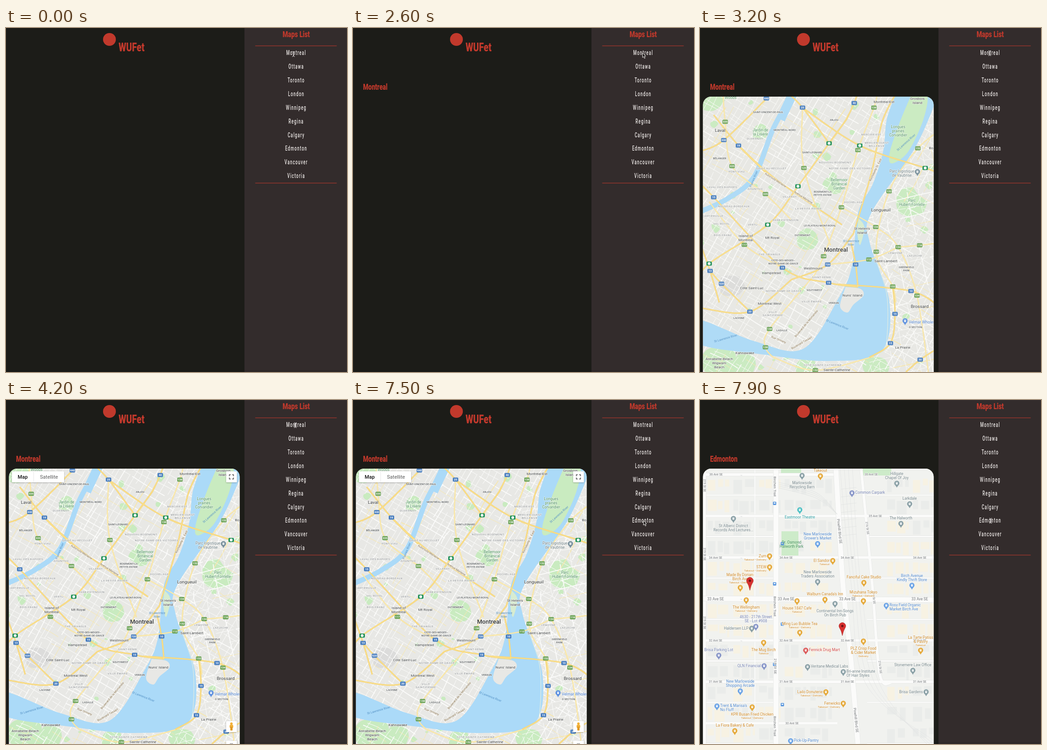
An HTML page with a canvas that plays this animation: 745 by 752 pixels, repeating every 8 s.

```html
<!DOCTYPE html>
<html lang="en">
<head>
<meta charset="utf-8">
<title>City maps</title>
<style>
html,body{margin:0;width:100%;height:100%;overflow:hidden;background:#1c1c18}
canvas{display:block}
</style>
</head>
<body>
<canvas id="stage" width="745" height="752"></canvas>
<script>
const W = 745, H = 752, LOOP = 8000, STEP = 100;
const FONT = 'Roboto, "Open Sans", sans-serif';
const RED = '#c1392c', BLANK = '#e4e4dc';
const ctx = document.getElementById('stage').getContext('2d');

const clamp = v => Math.max(0, Math.min(1, v));
const random = seed => () => (seed = (seed * 16807) % 2147483647) / 2147483647;
const layer = () => {
  const c = document.createElement('canvas');
  c.width = W; c.height = H;
  return c.getContext('2d');
};

function rect(g, x, y, w, h, color) {
  g.fillStyle = color;
  g.fillRect(x, y, w, h);
}
function round(g, x, y, w, h, r, color) {
  g.fillStyle = color;
  g.beginPath();
  g.roundRect(x, y, w, h, r);
  g.fill();
}
function disc(g, x, y, r, color) {
  g.fillStyle = color;
  g.beginPath();
  g.arc(x, y, r, 0, 7);
  g.fill();
}

// Smooth curve through flat x,y points
function trace(g, p) {
  const n = p.length / 2;
  const at = i => { const k = Math.max(0, Math.min(n - 1, i)) * 2; return [p[k], p[k + 1]]; };
  g.beginPath();
  g.moveTo(p[0], p[1]);
  for (let i = 0; i < n - 1; i++) {
    const [a, b, c, d] = [at(i - 1), at(i), at(i + 1), at(i + 2)];
    g.bezierCurveTo(b[0] + (c[0] - a[0]) / 6, b[1] + (c[1] - a[1]) / 6,
      c[0] - (d[0] - b[0]) / 6, c[1] - (d[1] - b[1]) / 6, c[0], c[1]);
  }
}
function line(g, p, width, color) {
  trace(g, p);
  g.lineWidth = width;
  g.strokeStyle = color;
  g.stroke();
}
function area(g, p, color) {
  trace(g, p);
  g.fillStyle = color;
  g.fill();
}
function roads(g, list, width, edge, fill) {
  for (const p of list) line(g, p, width + 1, edge);
  for (const p of list) line(g, p, width, fill);
}

// Text with "|" as line break, centred vertically on the first line
function label(g, x, y, text, o) {
  g.save();
  g.translate(x, y);
  g.rotate((o.turn || 0) * Math.PI / 180);
  g.font = `${o.weight || 400} ${o.size}px ${FONT}`;
  g.letterSpacing = (o.space || 0) + 'px';
  g.textAlign = o.align || 'center';
  g.textBaseline = 'middle';
  g.fillStyle = o.color;
  g.lineJoin = 'round';
  text.split('|').forEach((s, i) => {
    const dy = i * o.size * 1.13 + .5;
    if (o.halo) {
      g.strokeStyle = o.halo;
      g.lineWidth = 1.6;
      g.strokeText(s, 0, dy);
    }
    g.fillText(s, 0, dy);
  });
  g.restore();
}
const labels = (g, o, list) =>
  list.forEach(([x, y, text, turn]) => label(g, x, y, text, {...o, turn}));

// Condensed display face
function display(x, y, text, size, o) {
  ctx.save();
  ctx.translate(x, y);
  ctx.scale(o.narrow, 1);
  label(ctx, 0, 0, text, {...o, size});
  ctx.restore();
}

function pin(g, x, y, color) {
  g.fillStyle = color;
  g.beginPath();
  g.arc(x, y - 1, 5.6, 2.6, .54);
  g.quadraticCurveTo(x + 1.5, y + 5, x, y + 8.5);
  g.quadraticCurveTo(x - 1.5, y + 5, x - 4.8, y + 1.9);
  g.fill();
  rect(g, x - 2, y - 3.5, 4, 5, '#fff');
  rect(g, x - .5, y - 3.5, 1, 3, color);
}

/* ---------- first city ---------- */
function streets(g, x, y, reach, angle, step, seed) {
  const rnd = random(seed);
  g.save();
  g.translate(x, y);
  g.rotate(angle);
  for (let side = 0; side < 2; side++) {
    for (let u = -reach; u < reach; u += step * (.6 + rnd() * .8)) {
      for (let v = -reach; v < reach;) {
        const len = 25 + rnd() * 110, drift = (rnd() - .5) * 8;
        line(g, [v, u, v + len / 2, u + drift, v + len, u + drift * .6], rnd() < .25 ? 1.8 : .9,
          rnd() < .1 ? '#f7e7ad' : '#fcfcfb');
        v += len + rnd() * 24;
      }
    }
    g.rotate(Math.PI / 2);
  }
  g.restore();
}

// Irregular park outline
function blob(g, x, y, r, rnd, color) {
  const p = [];
  for (let i = 0; i < 8; i++) {
    const a = i * Math.PI / 4, d = r * (.7 + rnd() * .5);
    p.push(x + Math.cos(a) * d, y + Math.sin(a) * d);
  }
  area(g, [...p, p[0], p[1]], color);
}

// A shield stands on every inner point of a numbered road
const blueRoads = [
  [440, 0,270, 52,245, 145,154, 160,130], [15, 0,340, 30,370, 180,524, 281,557, 345,566],
  [10, 300,560, 461,575, 530,615], [15, 421,565, 426,625, 416,689, 370,720],
  [20, 0,612, 109,620, 200,550], [720, 200,550, 279,517, 335,450], [13, 0,470, 22,531, 42,600],
  [520, 22,531, 47,559, 109,620], [19, 30,190, 84,257, 143,315], [25, 190,140, 224,174, 282,252],
  [40, 320,200, 337,164, 345,140], [10, 330,470, 340,517, 345,566], [30, 450,752, 481,725, 520,700]
];
const greenRoads = [
  [335, 50,140, 55,205, 70,302, 143,363, 200,420], [138, 388,140, 380,174, 345,267, 309,392, 270,499, 250,540],
  [138, 250,540, 152,658, 143,698, 160,720], [125, 224,174, 227,306, 285,475],
  [134, 309,392, 384,435, 433,479, 474,585, 500,760], [116, 433,479, 480,475, 520,470],
  [112, 279,517, 369,506, 433,479], [117, 20,380, 97,474, 180,524], [132, 160,720, 252,748, 380,718],
  [132, 530,220, 476,263, 413,357, 385,489, 421,565, 428,600]
];
const leafRoads = [['', -10,560, 20,515, 148,430, 214,346, 282,252, 320,200], ['', 225,175, 349,257, 492,306, 530,320]];
const plainRoads = [[84,257, 165,330, 310,430], [335,450, 375,315, 398,205, 430,140]];

function shields(g, list, color) {
  for (const [ref, ...p] of list)
    for (let i = 2; i < p.length - 2; i += 2) {
      const [x, y] = [p[i], p[i + 1]];
      round(g, x - 6, y - 4.5, 12, 9, 2, color);
      if (ref) label(g, x, y, '' + ref, {size: 6.2, weight: 700, color: '#fff'});
      else disc(g, x, y, 3, '#fff');
    }
}

function drawMontreal() {
  const g = layer(), rnd = random(33);
  const park = '#c9ebc0', water = '#abdaf8', land = '#e8e8e5', halo = 'rgba(250,250,248,.8)';
  rect(g, 0, 0, W, H, land);

  for (let i = 0; i < 40; i++) blob(g, rnd() * 510, 150 + rnd() * 600, 3 + rnd() * 7, rnd, park);
  [[132,225,20], [233,466,26], [292,344,22], [462,380,30], [45,735,42], [100,735,30], [25,155,28],
    [230,742,24], [385,742,30]].forEach(p => blob(g, ...p, rnd, park));
  blob(g, 68, 565, 26, rnd, '#dcdcdb');

  streets(g, 200, 430, 420, .53, 14, 71);
  g.save();
  g.beginPath();
  g.rect(370, 180, 150, 580);
  g.clip();
  streets(g, 460, 470, 320, -.22, 22, 19);
  g.restore();

  line(g, [202,145, 160,220, 118,325, 62,372, 0,402], 11, water);
  line(g, [202,145, 176,200], 20, water);
  area(g, [428,145, 408,200, 400,270, 378,340, 345,405, 332,520, 303,590, 226,701, 120,685, -5,638,
    -5,690, 140,714, 280,728, 395,708, 414,600, 371,470, 374,405, 468,265, 515,160, 515,145], water);
  area(g, [462,145, 496,145, 488,200, 455,270, 420,296, 414,275, 435,210, 462,145], park);
  area(g, [346,416, 359,435, 350,474, 344,450, 346,416], '#d7ecd0');
  area(g, [318,566, 350,570, 357,585, 335,605, 322,622, 306,608, 318,566], land);
  line(g, [374,450, 388,515, 409,590, 406,695, 385,712], 1.3, '#dcebe4');

  const bare = list => list.map(r => r.slice(1));
  roads(g, bare(greenRoads), 1.5, '#f3d98a', '#fdeeb4');
  roads(g, [...bare(blueRoads), ...bare(leafRoads), ...plainRoads], 2.1, '#eec96a', '#fbe08a');
  shields(g, greenRoads, '#6aa256');
  shields(g, blueRoads, '#4a7fc0');
  shields(g, leafRoads, '#23925a');

  labels(g, {size: 6.2, space: .5, color: '#80848a', halo}, [
    [120,242,'DUVERNAY'], [374,233,'MERCIER-EST'], [386,251,'MERCIER-OUEST|BELLERIVE'],
    [295,294,'NOUVEAU-ROSEMONT'], [329,307,'NOTRE-DAME-DES-VICTOIRES'], [156,307,'SAULT-AU-RÉCOLLET'],
    [80,314,'PONT-VIAU'], [121,352,'AHUNTSIC'], [48,348,'LAVAL-DES-RAPIDES'], [196,369,'VILLERAY'],
    [74,390,'NOUVEAU-BORDEAUX'], [28,411,'CARTIERVILLE'], [47,428,'VAL-ROYAL'], [115,430,'VERTU'],
    [187,420,'PARK-EXTENSION'], [237,395,'LA PETITE-PATRIE'], [335,381,'HOCHELAGA'], [50,453,'BOIS-FRANC'],
    [152,495,'THE TRIANGLE'], [427,492,'LEMOYNE'], [469,498,'LAFLÈCHE'], [266,545,'SAINT-HENRI'],
    [183,575,'NOTRE-DAME-DE-GRÂCE'], [244,598,'VILLE-ÉMARD'], [159,621,'VILLE|SAINT-PIERRE'],
    [268,737,'CÔTE-SAINTE-CATHERINE']]);
  labels(g, {size: 5.8, weight: 500, color: '#55595d', halo}, [
    [149,184,'SAINT-VINCENT-DE-PAUL'], [185,223,'MONTRÉAL-NORD'], [293,201,'ANJOU'], [245,272,'SAINT-LEONARD'],
    [43,285,'BÉLANGER'], [268,358,'ROSEMONT-LA|PETITE-PATRIE'], [262,432,'LE PLATEAU-MONT-ROYAL'],
    [224,453,'OUTREMONT'], [182,508,'CÔTE-DES-NEIGES–|NOTRE-DAME-DE-GRÂCE'], [250,573,'SOUTHWEST'],
    [292,601,'VERDUN'], [179,661,'LASALLE'], [85,634,'LACHINE'], [451,523,'GREENFIELD|PARK'], [471,654,'O SECTION']]);
  labels(g, {size: 8, color: '#3f4245', halo}, [
    [402,161,'Montréal-Est'], [475,154,'Grosbois|Island'], [158,458,'Mt Royal'], [100,454,'Island of|Montreal'],
    [247,525,'Westmount'], [156,535,'Hampstead'], [113,568,'Côte Saint-Luc'], [152,602,'Montreal West'],
    [406,509,'Saint-Lambert'], [354,438,"St Helen's|Island"], [333,584,"Nuns' Island"], [443,698,'La Prairie'],
    [98,710,'Kahnawake'], [42,723,'Annabelle-Beach|Wigwam|Beach'], [299,747,'Sainte-Catherine'], [505,262,'Bo']]);
  labels(g, {size: 9.8, color: '#36393b', halo}, [[44,224,'Laval'], [395,398,'Longueuil'], [480,609,'Brossard']]);
  label(g, 297, 485, 'Montreal', {size: 13, weight: 500, color: '#303234', halo});
  labels(g, {size: 8.2, color: '#47905a', halo}, [
    [67,152,'Woods'], [132,223,'Jardin de|la Lisière'], [304,332,'Bellemoor|Botanical|Garden'],
    [463,377,'Parc|Hubert-Fontelle'], [433,216,'Longues|prairies|Corvandier']]);
  label(g, 441, 313, 'Parc logistique|de Vaubrise', {size: 8.2, color: '#6f8088', halo});
  label(g, 456, 643, 'Velmar Wholesale', {size: 8.6, align: 'left', color: '#4a7fd0', halo});
  labels(g, {size: 6.6, color: '#5390c4'}, [
    [450,250,'St Lawrence River',-42], [300,648,'St Lawrence River',22], [56,678,'St Lawrence River',-16],
    [330,466,'St Lawrence|River'], [117,330,'Prairies River',-68]]);
  labels(g, {size: 6.4, color: '#7c6540', halo}, [
    [165,332,'Autoroute Merlaine',33], [226,370,'Avenue Merlaine',33], [383,310,'Rochebelle St. East',-64],
    [222,688,'Boulevard Tessart',-30], [172,681,'Rue Ormeny',22], [232,646,'Boulevard de la Mornandie',-50]]);
  pin(g, 475, 315, '#78909c');
  pin(g, 448, 641, '#5b8fe0');
  return g.canvas;
}

/* ---------- second city ---------- */
function marker(g, x, y) {
  g.fillStyle = '#d8302f';
  g.strokeStyle = '#a8211f';
  g.lineWidth = .7;
  g.beginPath();
  g.arc(x, y, 7.4, 2.75, .39);
  g.quadraticCurveTo(x + 2, y + 10, x, y + 21);
  g.quadraticCurveTo(x - 2, y + 10, x - 6.8, y + 2.9);
  g.fill();
  g.stroke();
  disc(g, x, y, 2.6, '#6e1313');
}

// Places: x, y, name, where the pin stands, note
function places(g, color, ink, list) {
  for (const [x, y, name, spot, note] of list) {
    const rows = name.split('|').length;
    const align = {left: 'left', right: 'right'}[spot] || 'center';
    const [px, py] = {left: [-7, 2], right: [7, 1], above: [0, -15], below: [0, rows * 9 + (note ? 11 : 4)]}[spot];
    const o = {size: 8.3, align, color: ink, halo: 'rgba(250,250,247,.85)'};
    pin(g, x + px, y + py, color);
    label(g, x, y, name, o);
    if (note) label(g, x, y + rows * 9 - 1, note, {...o, size: 6.2});
  }
}

function drawEdmonton() {
  const g = layer(), rnd = random(407);
  const edge = '#dfe1e0', road = '#fbfbfa', both = 'Takeout • Delivery', take = 'Takeout';
  const aveY = i => 163 + i * 90.6;
  rect(g, 0, 0, W, H, '#f1f2ef');

  for (let x = 14; x < 511; x += 56) for (let y = 168; y < H; y += 45.3) {
    if (x > 280 && x < 360) continue;
    const beige = y > 340 && y < 520 || rnd() < .22;
    for (let dx = 3; dx < 46;) {
      const w = 9 + rnd() * 14, h = 14 + rnd() * 18;
      g.globalAlpha = .75;
      rect(g, x + dx, y + 4 + rnd() * 4, Math.min(w, 50 - dx), h, beige ? '#faf2df' : '#e9eae9');
      dx += w + 2 + rnd() * 5;
    }
  }
  g.globalAlpha = 1;
  [[178,287,37,53], [177,150,44,13], [350,150,68,15]].forEach(r => rect(g, ...r, '#cdebc9'));

  const lanes = [[120,150,120,690]], avenues = [];
  for (let i = 0; i < 7; i++) {
    const y = aveY(i);
    lanes.push([7,y + 45,160,y + 45], [365,y + 45,511,y + 45]);
    if (i !== 3) avenues.push([7,y, i % 6 ? 511 : 300,y]);
  }
  roads(g, lanes, 3, edge, road);
  roads(g, [...avenues, [10,150,10,752], [352,150, 376,400, 393,600, 420,617]], 6, edge, road);
  roads(g, [[7,434,511,437], [166,150,166,752], [297,150, 312,400, 330,570, 345,752]], 11, edge, road);
  for (let i = 0; i < 4; i++) {
    line(g, [306 + i * 9,150, 330 + i * 7,400, 362 + i * 10,620, 511,745 + i * 8], .7, '#e1e3e2');
    line(g, [172,180 + i * 4, 255,203 + i * 4, 300,250], .9, '#e0e2e1');
  }
  for (let y = 195; y < 300; y += 17) line(g, [308,y, 342,y - 4], .7, edge);

  const street = {size: 6.6, color: '#75797c', halo: '#fafaf9'}, arrow = {size: 7, color: '#a9adaf'};
  const spread = [34, 188, 322, 480];
  [[35, 374], [383], spread, spread, spread, spread, [201]].forEach((xs, i) => {
    xs.forEach(x => label(g, x, aveY(i), `${36 - i} Ave SE`, i === 3 ? {...street, size: 8.2} : street));
    label(g, 90, aveY(i), '→', arrow);
  });
  for (let i = 0; i < 3; i++) {
    label(g, 164, 189 + i * 262, 'Birchen Trail', {...street, size: 8, turn: 90});
    label(g, 10, 187 + i * 150, '219 St SE', {...street, turn: 90});
    label(g, 366 + i * 14, 280 + i * 152, '216 St SE', {...street, turn: 84});
  }
  for (let y = 226; y < 700; y += 88) {
    const x = y % 176 < 88 ? 163 : 180;
    round(g, x - 3.5, y - 3.5, 7, 7, 1, '#4d8fdc');
    rect(g, x - 1.7, y - 2, 3.4, 2.6, '#fff');
  }
  labels(g, {...street, size: 8}, [[305,287,'Pinehill Blvd SE',84], [341,700,'Pinehill Blvd SE',84], [165,582,'218 St SE',90]]);

  places(g, '#8aa0a6', '#74858c', [
    [223,181,'Marlowside|Recycling Barn','above'], [430,161,'Hillgate|Chapel Of Joy','below'],
    [458,215,'Larkdale','below'], [439,258,'The Halworth','below'],
    [73,275,'St Alberic District|Records And Lectures...','above'], [257,376,'New Marlowside|Traders Association','below'],
    [295,461,'Continental Inn-Songs|On Birch Pub','above'], [106,499,'Haldersen LLP','right'],
    [242,582,'Veritane Medical Labs','left'], [320,593,'Bri-anne Institute|Of Hair Styles','left'],
    [465,579,'Stonemere Law Office','below'], [487,638,'Brisa Gardens','right']]);
  places(g, '#8795c8', '#7482b4', [
    [339,202,'Common Carpark','left'], [122,474,'4630 - 217th Street|SE - Lot #908','below'],
    [41,546,'Brisa Parking Lot','below'], [133,581,'QLN Financial','right']]);
  places(g, '#6ba3e6', '#5088cf', [
    [257,293,"New Marlowside|Grower's Market",'below'], [463,384,'Birch Avenue|Kindly Thrift Store','below'],
    [414,448,'Rosy Field Organic|Market Birch Ave','left'], [88,615,'New Marlowside|Shopping Arcade','below'],
    [44,668,"Trent & Marisa's|No Fluff",'left'], [205,744,'Pick-Up-Pantry','left']]);
  places(g, '#e5a93a', '#cf8a2b', [
    [263,154,take,'below'], [145,341,'Zum','right',both], [145,365,'STEW','right',both], [283,351,'El Sandor','right',take],
    [88,382,'Made By Dorian-|Birch Ave','below',both], [358,387,'Fanciful Cake Studio','below'],
    [273,424,"Walburn Canada's Inn",'below'], [357,420,'Mizuhana Tokyo','below',both],
    [101,453,'The Wellingham','above',both], [212,455,'House 1847 Cafe','above',take],
    [218,489,'Ming Luo Bubble Tea','below',both], [357,543,'PLZ Crisp Food|& Cider Market','above','Delivery'],
    [139,546,'The Mug Birch','above',take], [482,519,'La Tarte Patiss|& Pastry','below',take],
    [268,638,'Lailo Donuterie','right',both], [306,663,'Fenwicks','right',both],
    [114,687,'KPR Busan Fried Chicken','above',both], [76,711,'La Fiora Bakery & Cafe','below']]);
  places(g, '#4fc0c4', '#2fa0a8', [[218,256,'Eastmoor Theatre','above']]);
  places(g, '#dc5a5a', '#d04848', [[238,546,'Fennick Drug Mart','left']]);
  label(g, 200, 311, 'Dr. Osmond|Halworth Park', {size: 8.2, color: '#4d9466'});
  marker(g, 109, 395);
  marker(g, 311, 494);
  return g.canvas;
}

/* ---------- page ---------- */
function controls() {
  ctx.save();
  ctx.shadowColor = 'rgba(0,0,0,.3)';
  ctx.shadowBlur = 3;
  ctx.shadowOffsetY = 1;
  round(ctx, 13, 156, 114, 24, 1.5, '#fff');
  [156, 702, 745].forEach(y => round(ctx, 481, y, 23.5, 24, 1.5, '#fff'));
  ctx.restore();
  rect(ctx, 60, 157, 1, 22, '#e8e8e8');
  label(ctx, 36.5, 168, 'Map', {size: 11, weight: 500, color: '#111'});
  label(ctx, 94, 168, 'Satellite', {size: 11, color: '#5c5c5c'});
  ctx.strokeStyle = '#606060';
  ctx.lineWidth = 1.6;
  for (const a of [-1, 1]) for (const b of [-1, 1]) {
    ctx.beginPath();
    ctx.moveTo(492.5 + a * 4.6, 168 + b * 1.6);
    ctx.lineTo(492.5 + a * 4.6, 168 + b * 4.6);
    ctx.lineTo(492.5 + a * 1.6, 168 + b * 4.6);
    ctx.stroke();
  }
  disc(ctx, 492.5, 707.5, 2.8, '#f2b13a');
  round(ctx, 488.5, 710, 8, 7, 2, '#f2b13a');
  round(ctx, 490, 714, 5, 8.5, 1, '#e09a26');
  rect(ctx, 489, 751, 7, 1, '#777');
}

// Pointer moves: start, end, to x, to y, sideways swing
const moves = [[500,1000,633,55,0], [3800,4300,632,55,0], [4500,4900,634,110,0], [5000,5900,637,261,16], [5900,6300,635,264,0]];
function pointer(t) {
  let x = 628, y = 57;
  for (const [from, to, tx, ty, swing] of moves) {
    const f = 1 - (1 - clamp((t - from) / (to - from))) ** 2;
    x += (tx - x) * f + swing * Math.max(0, Math.sin(1.25 * Math.PI * f));
    y += (ty - y) * f;
  }
  return [Math.round(x), Math.round(y)];
}
function cursor(t) {
  const [x, y] = pointer(t);
  if (t === 2600 || t === 7500) {
    ctx.beginPath();
    [[0,0], [0,10], [2.3,8], [4.2,12], [5.8,11.2], [4,7.3], [7,7]].forEach(([dx, dy]) => ctx.lineTo(x + dx - .5, y + dy - .5));
    ctx.closePath();
    ctx.fillStyle = '#221f1f';
    ctx.strokeStyle = '#e6e3e0';
    ctx.lineWidth = 1;
    ctx.fill();
    ctx.stroke();
    return;
  }
  rect(ctx, x - 1, y - 5, 2, 10, '#cfcaca');
  for (const dx of [-3, 1]) for (const dy of [-6, 5]) rect(ctx, x + dx, y + dy, 2, 1, '#cfcaca');
}

const visits = [
  {name: 'Montreal', from: 2600, fade: 2900, speed: 320, map: drawMontreal(), controls: 3700},
  {name: 'Edmonton', from: 7600, fade: 7700, speed: 200, map: drawEdmonton(), controls: LOOP}
];
const cities = ['Montreal', 'Ottawa', 'Toronto', 'London', 'Winnipeg', 'Regina', 'Calgary', 'Edmonton', 'Vancouver', 'Victoria'];
const bold = {narrow: .75, weight: 900, color: RED};

function pane(v, t) {
  display(22, 129, v.name, 17.5, {...bold, align: 'left'});
  if (t < v.from + STEP) return;
  ctx.save();
  ctx.beginPath();
  ctx.roundRect(6.5, 150, 504, 640, 18);
  ctx.clip();
  rect(ctx, 0, 149, 520, 610, BLANK);
  ctx.globalAlpha = clamp((t - v.fade) / v.speed);
  ctx.drawImage(v.map, 0, 0);
  ctx.globalAlpha = 1;
  if (t >= v.controls) controls();
  ctx.restore();
}

function draw(t) {
  rect(ctx, 0, 0, W, H, '#1c1c18');
  rect(ctx, 521, 0, 224, H, '#332c2c');
  rect(ctx, 0, 748, W, 4, 'rgba(0,0,0,.1)');
  disc(ctx, 226, 25, 14, RED);
  display(246, 42.5, 'WUFet', 25.5, {...bold, align: 'left'});
  display(634, 14, 'Maps List', 18, bold);
  for (const y of [38.5, 338.5]) rect(ctx, 544.5, y, 178, 1, RED);
  cities.forEach((c, i) => display(634, 54.5 + i * 29.85, c, 15,
    {narrow: .56, space: 2.2, weight: 500, color: '#f0ecea'}));
  const visit = visits.findLast(v => t >= v.from);
  if (visit) pane(visit, t);
  cursor(t);
}

const start = performance.now();
function tick() {
  draw(Math.floor((performance.now() - start) % LOOP / STEP) * STEP);
  requestAnimationFrame(tick);
}
tick();
</script>
</body>
</html>
```
